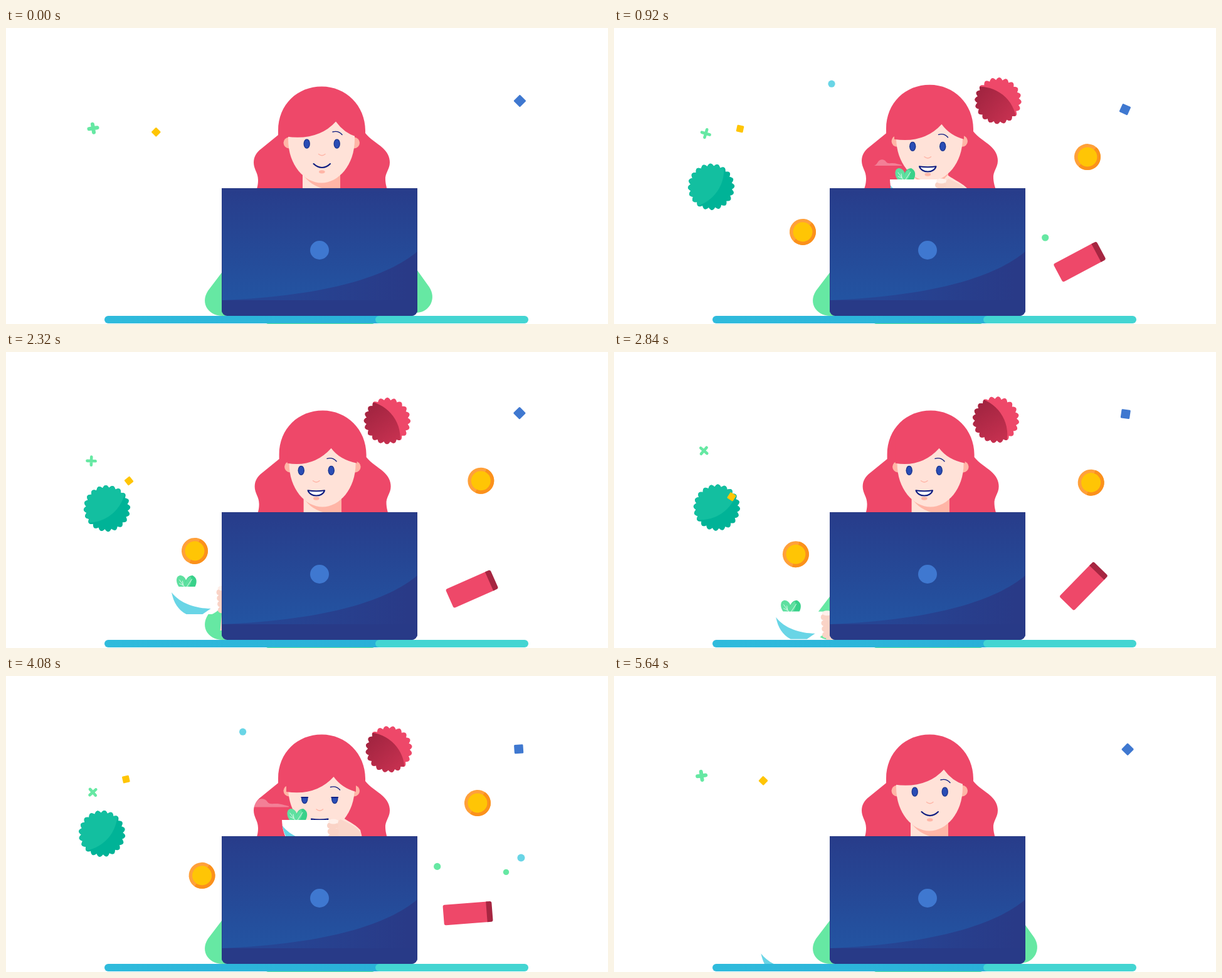
These frames come from a looping animation (960x473 px, 5.68 s). An HTML page with a canvas:

```html
<!DOCTYPE html>
<html lang="en">
<head>
<meta charset="utf-8">
<title>Lunch at the laptop</title>
<style>
html, body { margin: 0; width: 100%; height: 100%; overflow: hidden; background: #fff; }
canvas { display: block; width: 960px; height: 473px; }
</style>
</head>
<body>
<canvas id="stage" width="960" height="473"></canvas>
<script>
const c = document.getElementById('stage').getContext('2d');
const LOOP = 5.68, STEP = 0.04, TAU = Math.PI * 2;
const RED = '#ee4869', SKIN = '#ffe2d8', BLUSH = '#ffb5a6', NAVY = '#0c1c80';
const GREEN = '#66e8a3', CYAN = '#69d5e6', BLUE = '#3f78d0', YELLOW = '#ffc505';

// All times are in seconds
const clamp = v => Math.max(0, Math.min(1, v));
const mix = (a, b, u) => a + (b - a) * u;
const ramp = (s, a, b) => { const u = clamp((s - a) / (b - a)); return u * u * (3 - 2 * u); };
const pulse = (s, a, b, d) => ramp(s, a, a + d) - ramp(s, b - d, b);
const pop = s => { const u = clamp((s - 0.05) / 0.24) - 1; return 1 + 2.2 * u ** 3 + 1.2 * u ** 2; };

// Slow sway around a middle, with an optional steady drift
const sway = (s, mid, a, b, speed = 0) => mid + a * Math.cos(2.2 * s) + b * Math.sin(2.2 * s) + speed * s;

function at(x, y, deg, scale, draw) {
  if (scale < 0.01) return;
  c.save();
  c.translate(x, y);
  c.rotate(deg * Math.PI / 180);
  c.scale(scale, scale);
  draw();
  c.restore();
}

function fill(color, d) { c.fillStyle = color; c.fill(new Path2D(d)); }

function line(color, width, d) {
  c.strokeStyle = color;
  c.lineWidth = width;
  c.lineCap = c.lineJoin = 'round';
  c.stroke(new Path2D(d));
}

function oval(color, x, y, rx, ry = rx) {
  c.fillStyle = color;
  c.beginPath();
  c.ellipse(x, y, rx, ry, 0, 0, TAU);
  c.fill();
}

function box(color, x, y, w, h, r) {
  c.fillStyle = color;
  c.beginPath();
  c.roundRect(x, y, w, h, r);
  c.fill();
}

const tile = (color, size) => box(color, -size / 2, -size / 2, size, size, 1.5);

function blend(x0, y0, x1, y1, a, b) {
  const g = c.createLinearGradient(x0, y0, x1, y1);
  g.addColorStop(0, a);
  g.addColorStop(1, b);
  return g;
}

function seal(base, patch) {
  c.beginPath();
  for (let i = 0; i <= 240; i++) {
    const a = i / 240 * TAU, r = 33.2 + 4 * Math.abs(Math.cos(a * 10));
    c.lineTo(r * Math.cos(a), r * Math.sin(a));
  }
  c.fillStyle = base;
  c.fill();
  c.clip();
  oval(patch, 48, 0, 60);
}

function coin() {
  oval('#ffa03a', 0, 0, 21);
  c.fillStyle = '#fb911c';
  c.beginPath();
  c.arc(0, 0, 21, -0.9, 2.24);
  c.fill();
  oval(YELLOW, 0, 0, 15.5);
}

function book() {
  box(RED, -39, -16.4, 74, 32.8, 3);
  box('#a62641', 30, -16.4, 9, 32.8, [0, 3, 3, 0]);
}

function floaters(s) {
  const size = pop(s);
  at(sway(s, 610.2, -1.2, 2), sway(s, 113, -4.8, 1.2), 119 + 11 * s, size,
    () => seal(RED, blend(0, -30, 0, 35, '#c4304f', '#a12440')));
  at(sway(s, 158.2, 5.7, -0.7), 256.3 - 2.7 * s, 203 + 12 * s, size, () => seal('#00b397', '#13bfa0'));
  at(sway(s, 300.6, -10.9, -4.9), sway(s, 322, 1.4, 5), 20 - 15 * s, size, coin);
  at(sway(s, 756.3, 4.4, 0.7), sway(s, 206, 2.7, 1.4), 15 - 12 * s, size, coin);
  at(sway(s, 743, 6, 2.4), sway(s, 376, -2, -3.7), sway(s, -26.6, -19.5, -11), size, book);

  at(sway(s, 819, 0.4, -3, -1.3), sway(s, 123.5, -7, 10, -6), 45 - 12 * s - 11.5 * s * s, 1, () => tile(BLUE, 14.4));
  at(sway(s, 228.4, 10.9, -6.4, -18.3), sway(s, 147, 19.3, 1.6, 22.9), 45 - 36 * s, 1, () => tile(YELLOW, 11));
  at(sway(s, 138.7, 0.3, 7, 1.6), sway(s, 172.5, -12.3, -9.3, -1), -9 + 18 * s + 11 * s * s, 1,
    () => line(GREEN, mix(6, 4.6, ramp(s, 0, 0.8)), 'M-6.6 0H6.6M0-6.6V6.6'));

  const step = 45 * (s - 1.72);
  const dot = (color, x, y, r, from) => at(x, y, 0, pulse(s, from, 2.2, 0.18), () => oval(color, 0, 0, r));
  dot(CYAN, 383 + step, 89.2, 5.6, 0.64);
  dot(GREEN, 687.7, 299 - step, 5.6, 0.64);
  dot(CYAN, 816 - step, 290.5, 6, 1);
  dot(GREEN, 797.5, 308 - step, 4.7, 1.28);
}

function eye(x, y, lid) {
  c.save();
  c.beginPath();
  c.rect(x - 8, y - 9 + lid, 16, 20);
  c.clip();
  oval('#1b3590', x, y, 5.2, 7.8);
  oval('#2a4db5', x, y, 3.8, 6.4);
  if (lid > 2) line(NAVY, 2, `M${x - 5} ${y - 8.3 + lid}h10`);
  c.restore();
}

function girl(s) {
  const sip = pulse(s, 1, 2.2, 0.5), turn = ramp(s, 1.85, 2.3), rise = ramp(s, 0, 0.85);
  const hx = 1.6 * turn, hy = -2.7 * pulse(s, 0.2, 1.6, 0.7);
  const fx = -3.5 * rise - 5.5 * turn, fy = 4.3 * rise + 7.2 * sip;

  c.save();
  c.translate(hx, hy);
  fill(RED, 'M434 164C434 122 465 93.5 503.5 93.5S573 124 573 164V168C580 177 592 184 600 191C608 198 612 206 612 215C612 226 604 232 605 243C605.5 252 608 258 610 264H397C400 258 402 252 402 243C402 231 395 226 395 215C395 206 399 199 407 193L434 171Z');
  for (const x of [451.5, 555]) oval(BLUSH, x, 183.5, 9);
  fill(SKIN, 'M473 226H533V262H473Z');
  fill(BLUSH, 'M473 233Q485 253 512 258H533V228Z');
  fill(SKIN, 'M450 146V178C450 219 476 247.5 503 247.5S556 219 556 178V146Z');
  const tip = 526 + fx, top = 149.5 + fy - hy, side = top + 24;
  fill(RED, `M447 138V${side}Q${tip - 28} ${side + 7} ${tip} ${top}Q${tip + 13} ${side - 6} 558 ${side}V138Z`);
  c.restore();

  c.save();
  c.translate(fx, fy);
  for (const x of [479.7, 527.7]) eye(x, 185, 1.2 + 4.5 * sip);
  line(NAVY, 1.4, 'M521 166Q530 163.5 536 170.5');
  line(BLUSH, 1.4, 'M498.5 201.500Q504 206 509 201.500');
  oval(BLUSH, 503.8, 229.8, 4.8, 2.6);
  const open = ramp(s, 0.24, 0.72), low = 225 + 3 * open, edge = 7 - 5 * open;
  const lips = `M490.5 217Q504 ${229 - 10 * open} 517 217C${516 - edge} ${low} ${492 + edge} ${low} 490.5 217Z`;
  fill('#fff', lips);
  line(NAVY, 2.1, lips);
  c.restore();
}

function steam(s) {
  const u = (s - 0.92) / 0.8;
  c.globalAlpha = 0.3 * pulse(s, 0.64, 2.04, 0.2);
  at(415 - 28 * u, 220 - 12.5 * u, 0, 1 + 0.42 * u,
    () => fill('#fff', 'M0 0C3-1 4-3 6-6C9-11 16-11 19-6C21-3 25-4 29-4C35-4 39-2 44-1V0Z'));
  c.globalAlpha = 1;
}

function meal(s) {
  const back = ramp(s, 1.72, 2.32), rest = ramp(s, 2.32, 2.9);
  const lift = 1 - (1 - clamp(s / 0.92)) ** 4;
  const x = mix(mix(232, 440, ramp(s, 0, 0.7)), 263.5, back) - 6 * rest;
  const y = mix(mix(472, 242, lift) - 12 * ramp(s, 0.95, 1.6), 375, back) + 41 * rest;
  const held = s > 0.1;
  c.save();
  c.beginPath();
  c.rect(0, 0, 960, 460);
  c.clip();
  at(x, y, 0, 1, () => {
    if (held) {
      fill('#5fe0a0', 'M12 0C6-9 8-18 15-18C23-17 26-7 24 0Z');
      fill('#38d18a', 'M22 0C21-9 26-18 34-18C42-14 41-6 38 0Z');
      fill('#5fe0a0', 'M21 0C22-9 27-16 31-16C34-9 31-4 28 0Z');
      line('#d9f9e9', 1, 'M13-11L21 0M18-9L19-3M13-5L19-2M33-12L25 0');
      fill(SKIN, 'M84 2L92-7C103 1 116 6 125 16L138 70H82Z');
      fill('#fad6ca', 'M84 8L93-1C103 3 121 11 126 22L138 70H78Z');
      fill('#fff', 'M0 0H89C88 24 79 38 65 44H24C9 38 1 24 0 0Z');
    }
    fill(CYAN, 'M0.5 9C14 27 40 35 63 35L50 44H24C11 37 4 26 0.5 9Z');
    if (held) {
      for (let i = 0; i < 4; i++) box('#fad3c6', 72 + i * 0.8, 4 + i * 9.4, 18, 10, 5);
      oval('#fff0ea', 82, 2.5, 8, 4);
    }
  });
  c.restore();
}

function elbows(s) {
  fill(GREEN, 'M350 383L325 416C308 436 320 460 346 460H350Z');
  at(-125 * s, 95 * s, 0, s < 0.32 ? 1 : 0,
    () => fill(GREEN, 'M630 350L655 386L675 414C687 432 676 454 655 455H630Z'));
}

function desk() {
  c.save();
  c.beginPath();
  c.roundRect(344, 256, 312, 204, [0, 0, 9, 9]);
  c.clip();
  c.fillStyle = blend(0, 256, 0, 435, '#283c8a', '#2354a2');
  c.fillRect(344, 256, 312, 204);
  fill(blend(430, 0, 640, 0, '#264594', '#293a87'), 'M656 357C610 396 515 428 344 435H656Z');
  c.fillStyle = '#283a87';
  c.fillRect(344, 435, 312, 25);
  c.strokeStyle = '#273781';
  c.lineWidth = 1.5;
  c.strokeRect(344, 256, 312, 210);
  c.restore();
  oval(BLUE, 500, 355, 15);

  box(GREEN, 413, 462, 176, 11, 6);
  box(blend(157, 0, 600, 0, '#2fbbdc', '#29b0d8'), 157, 460, 450, 12, 6);
  box('#43d5d2', 589, 460, 244, 12, 6);
}

function render(now) {
  const t = Math.floor(now / 1000 % LOOP / STEP + 1e-6) * STEP;
  const s = Math.min(t, LOOP - t); // plays forward, then back
  c.fillStyle = '#fff';
  c.fillRect(0, 0, 960, 473);
  elbows(s);
  girl(s);
  steam(s);
  floaters(s);
  meal(s);
  desk();
}

let start;
function tick(now) {
  if (start === undefined) start = now;
  render(Math.max(0, now - start));
  requestAnimationFrame(tick);
}
render(0);
requestAnimationFrame(tick);
</script>
</body>
</html>
```
